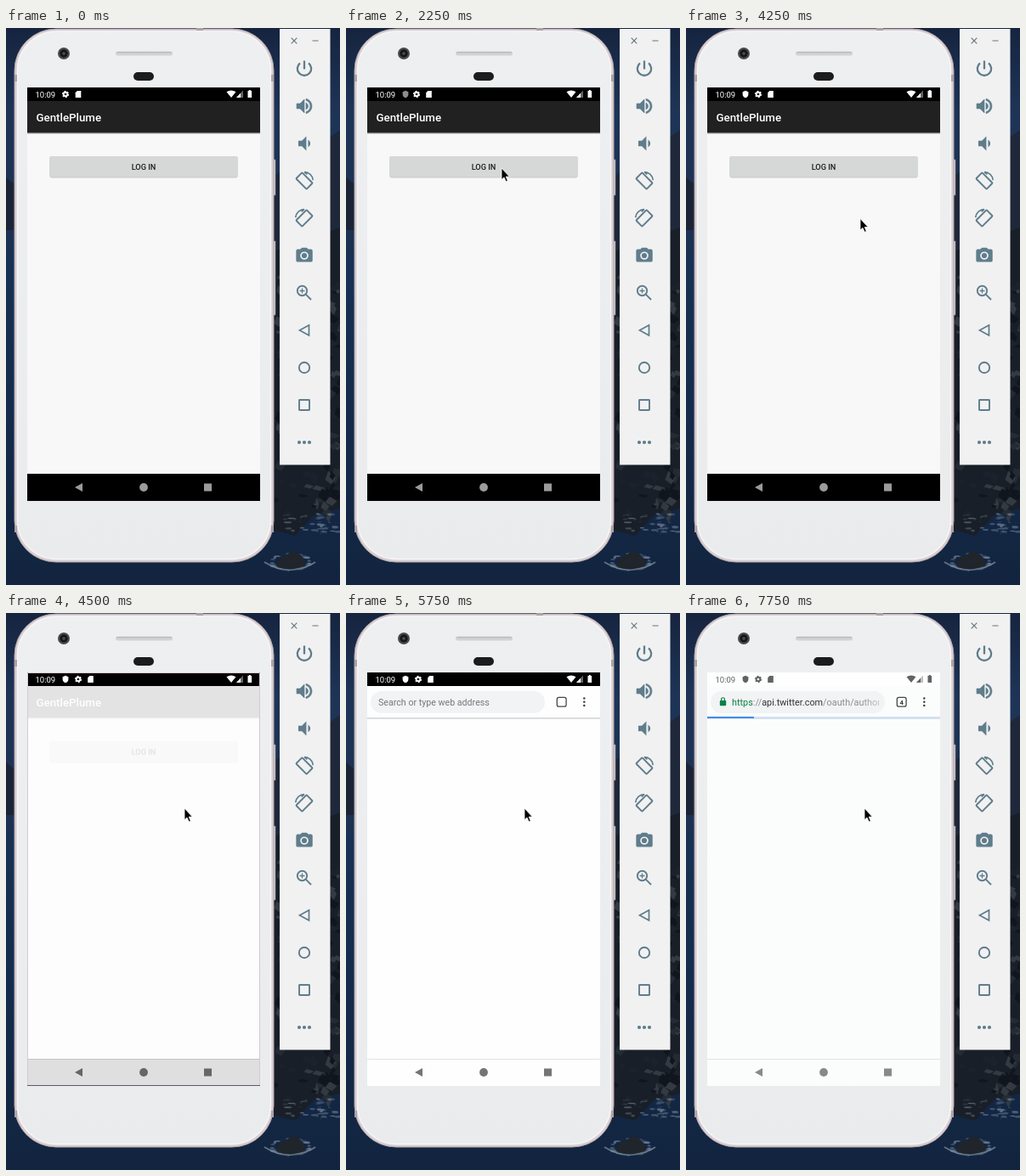
An HTML page for the animation above (8000 ms loop, 393 px wide and 656 px high).

```html
<!DOCTYPE html>
<html lang="en">
<head>
<meta charset="utf-8">
<title>Emulator login</title>
<style>
  html, body { margin: 0; width: 100%; height: 100%; overflow: hidden; background: #14294a; }
  svg { display: block; width: 393px; height: 656px; font-family: Roboto, Arial, sans-serif; }
  .tool { fill: #5f7d8b; }
  .line { fill: none; stroke: #5f7d8b; stroke-width: 1.9; }
</style>
</head>
<body>
<svg viewBox="0 0 393 656" xmlns="http://www.w3.org/2000/svg">
  <defs>
    <linearGradient id="sea" x2="0" y2="1">
      <stop offset="0" stop-color="#16243f"/>
      <stop offset=".15" stop-color="#1e3457"/>
      <stop offset=".36" stop-color="#1d3252"/>
      <stop offset=".42" stop-color="#173154"/>
      <stop offset=".7" stop-color="#142b4b"/>
      <stop offset="1" stop-color="#12243f"/>
    </linearGradient>
    <linearGradient id="shell" x2="0" y2="1">
      <stop offset="0" stop-color="#eeeff0"/>
      <stop offset="1" stop-color="#e9ebed"/>
    </linearGradient>
    <linearGradient id="urlFade" x1="205" x2="229" gradientUnits="userSpaceOnUse">
      <stop offset="0" stop-color="#f1f3f4" stop-opacity="0"/>
      <stop offset="1" stop-color="#f1f3f4" stop-opacity=".6"/>
    </linearGradient>
    <clipPath id="urlClip"><rect x="30" y="92" width="197" height="26"/></clipPath>
    <clipPath id="screenClip"><rect x="25" y="70" width="274" height="487"/></clipPath>
    <g id="gear">
      <circle r="2.3" fill="none" stroke="currentColor" stroke-width="1.900"/>
      <circle r="3.500" fill="none" stroke="currentColor" stroke-width="1.300" stroke-dasharray="1.830 1.830"/>
    </g>
    <path id="card" d="M-1.200 -4H3.300V4H-3.300V-1.800Z" fill="currentColor"/>
    <path id="shield" d="M0 -4.200L3.400 -2.800V0C3.400 2.100 2 3.700 0 4.300C-2 3.700 -3.400 2.100 -3.400 0V-2.800Z" fill="currentColor"/>
  </defs>

  <!-- wallpaper -->
  <rect width="393" height="656" fill="url(#sea)"/>
  <path d="M0 176L10 184V238H0Z" fill="#1b2437"/>
  <path d="M310 178L393 120V330L310 290Z" fill="#1e283a"/>
  <path d="M310 265L393 235V566L362 574L340 598L310 590Z" fill="#191f28"/>
  <g id="rocks"></g>
  <g id="foam"></g>
  <path d="M318 634Q320 622 330 621Q337 613 346 620Q354 627 351 636Q331 640 318 634Z" fill="#20252c"/>
  <path d="M304 629Q322 640 338 638T364 629" fill="none" stroke="#8796a6" stroke-width="1.600" opacity=".7"/>

  <!-- phone -->
  <path d="M314 155h3v42h-3zM314 251h3v87h-3z" fill="#d9d5d7" stroke="#83858d" stroke-width=".6"/>
  <rect x="10" y="1" width="305" height="628" rx="49" fill="#dacfd2" stroke="#aca3a8"/>
  <rect x="13.500" y="4" width="298" height="621.500" rx="46" fill="url(#shell)" stroke="#f8f6f7" stroke-width="1.500"/>
  <path d="M10 55h3v8h-3zM312 55h3v8h-3zM10 586h3v8h-3zM312 586h3v8h-3zM224 0h8v3h-8z" fill="#aaa2a6"/>
  <circle cx="68" cy="30" r="7" fill="#4b4b4d"/>
  <circle cx="68" cy="30" r="4.700" fill="#171719"/>
  <circle cx="68" cy="30" r="1.800" fill="#4e5155"/>
  <rect x="129" y="27.500" width="67" height="5" rx="2.500" fill="#d2d3d4"/>
  <rect x="130" y="28" width="65" height="1.500" rx=".7" fill="#bdbec0"/>
  <rect x="150" y="52" width="24" height="10" rx="5" fill="#1c1c1e"/>

  <!-- screen -->
  <g clip-path="url(#screenClip)">
    <rect x="25" y="70" width="274" height="487" fill="#f8f8f8"/>
    <rect x="25" y="86" width="274" height="38" fill="#212121"/>
    <rect x="25" y="123.500" width="274" height="1.500" fill="#c9c9c9"/>
    <text x="35.500" y="110" font-size="13.300" font-weight="500" fill="#fff">GentlePlume</text>
    <rect x="51.500" y="152" width="221" height="24.500" rx="2" fill="#c9c9c9"/>
    <rect id="button" x="51" y="151" width="222" height="24.500" rx="2"/>
    <text x="162" y="167" font-size="9.200" font-weight="500" text-anchor="middle" fill="#1c1c1c">LOG IN</text>
    <rect x="25" y="525" width="274" height="32" fill="#000"/>

    <g id="browser">
      <rect id="page" x="25" y="86" width="274" height="471"/>
      <g id="omnibox">
        <rect x="29" y="92" width="205" height="26" rx="13" fill="#f1f3f4"/>
        <text id="hint" x="38" y="109" font-size="10.670" fill="#75787b">Search or type web address</text>
        <g id="address" clip-path="url(#urlClip)">
          <text id="url" y="109" font-size="10.850" fill="#8a8d90"><tspan id="scheme">https</tspan><tspan>://</tspan><tspan fill="#303336">api.twitter.com</tspan><tspan>/oauth/authorize</tspan></text>
          <rect x="205" y="96" width="24" height="18" fill="url(#urlFade)"/>
        </g>
        <g id="lock">
          <rect x="39.800" y="103" width="7.400" height="6.200" rx="1" fill="#0b8043"/>
          <path d="M41.500 103.500V101.700a2 2 0 0 1 4 0V103.500" fill="none" stroke="#0b8043" stroke-width="1.100"/>
        </g>
        <rect x="248.300" y="99.300" width="10.800" height="10.800" rx="2.200" fill="none" stroke="#45484a" stroke-width="1.300"/>
        <text id="tabs" x="253.700" y="107.500" font-size="7.600" font-weight="700" text-anchor="middle" fill="#333">4</text>
        <path d="M280.300 100.500h0M280.300 104.800h0M280.300 109.100h0" stroke="#3c3f42" stroke-width="2.500" stroke-linecap="round"/>
        <rect x="25" y="123" width="274" height="2" fill="#dadcdd"/>
      </g>
      <g id="progress">
        <rect x="25" y="122" width="274" height="2" fill="#cfe2fc"/>
        <rect id="bar" x="25" y="122" height="2" fill="#3f8cf0"/>
      </g>
      <rect x="25" y="525" width="274" height="1" fill="#e2e2e2"/>
    </g>

    <g id="nav">
      <path d="M90 536V546L81 541ZM233 536.500h9v9h-9z"/>
      <circle cx="162" cy="541" r="4.900"/>
    </g>

    <rect id="status" x="25" y="70" width="274" height="16"/>
    <g id="icons">
      <text x="34.500" y="81.500" font-size="9.500" fill="currentColor">10:09</text>
      <use id="shieldIcon" href="#shield" x="70" y="78"/>
      <use id="gearIcon" href="#gear" y="78"/>
      <use id="cardIcon" href="#card" y="78"/>
      <path d="M259.500 75.300Q265 71.800 270.500 75.300L265 82Z" fill="currentColor"/>
      <path d="M279 73.500V82H271Z" fill="currentColor" opacity=".4"/>
      <path d="M276 76.700V82H271Z" fill="currentColor"/>
      <path d="M285.800 73h2v1h1.300v8h-4.600v-8h1.300z" fill="currentColor"/>
    </g>
    <g id="edge" fill="none">
      <path d="M25.500 557V70.500H298.500V557" stroke="#d9c8d2"/>
      <path d="M25 556.500H299" stroke="#5e5965"/>
    </g>
  </g>

  <!-- emulator controls -->
  <rect x="322" y="1" width="59.500" height="513.500" fill="#f1f1f2"/>
  <path d="M335.700 11.700l6.600 6.600m0-6.600l-6.600 6.600M360.500 15h7" stroke="#66757d" stroke-width="1.200"/>
  <path class="line" style="stroke-width:2.300" d="M351 38.500V48.500M346 41.300A8.200 8.200 0 1 0 356 41.300"/>
  <path class="tool" transform="translate(339 80)" stroke="#5f7d8b" stroke-width=".6" d="M3 9v6h4l5 5V4L7 9H3zm13.500 3c0-1.770-1.020-3.290-2.500-4.030v8.050c1.480-.73 2.500-2.250 2.500-4.020zM14 3.230v2.060c2.890.86 5 3.540 5 6.710s-2.110 5.850-5 6.710v2.060c4.010-.91 7-4.490 7-8.770s-2.990-7.860-7-8.770z"/>
  <path class="tool" transform="translate(338.700 123.400) scale(1.050)" d="M18.500 12c0-1.770-1.020-3.290-2.500-4.030v8.050c1.480-.73 2.500-2.250 2.500-4.020zM5 9v6h4l5 5V4L9 9H5z"/>
  <g id="turns"></g>
  <path class="tool" fill-rule="evenodd" transform="translate(339.400 256.800) scale(.970 .940)" d="M9 2L7.200 4H4a2 2 0 0 0-2 2v12a2 2 0 0 0 2 2h16a2 2 0 0 0 2-2V6a2 2 0 0 0-2-2h-3.200L15 2zM12 7a5 5 0 1 1 0 10a5 5 0 1 1 0-10z"/>
  <circle class="tool" cx="351" cy="268" r="3.100"/>
  <circle class="line" cx="348.500" cy="309.500" r="5.700"/>
  <path class="line" d="M352.700 313.700L359 320"/>
  <path class="line" style="stroke-width:1.300" d="M345.500 309.500h6m-3-3v6"/>
  <path class="line" style="stroke-width:1.700" d="M356.500 350V362L345.500 356Z"/>
  <circle class="line" cx="351" cy="400" r="6.200"/>
  <rect class="line" x="345" y="438" width="12" height="12" rx=".5"/>
  <path d="M345 488h0M351 488h0M357 488h0" stroke="#5f7d8b" stroke-width="4.200" stroke-linecap="round"/>

  <path id="cursor" d="M0 0V13.500L3 10.900L5.200 15.800L7.300 14.900L5.200 10.100H9.300Z" fill="#000" stroke="#fff" stroke-width=".8"/>
</svg>
<script>
const LOOP = 8000;
const el = id => document.getElementById(id);
const set = (id, attrs) => {
  for (const key in attrs) el(id).setAttribute(key, attrs[key]);
};
const show = (id, on) => set(id, { visibility: on ? "inherit" : "hidden" });

// Each track lists [start ms, value]; the value holds until the next start.
const tracks = {
  cursor: [[0, null], [250, [251.5, 128]], [500, [194.5, 151]], [750, [183, 165]],
           [3000, [179, 165.5]], [3250, [156, 162]], [4250, [205, 224.5]], [4500, [210, 230]]],
  notice: [[0, [0, 70, 85]], [2250, [.55, 83, 97.5]], [2500, [1, 85, 99.5]]],
  button: [[0, "#d6d7d7"], [3750, "#bfc0c0"], [4000, "#d6d7d7"]],
  browser: [[0, 0], [4500, .88], [4750, 1]],
  edge: [[0, 0], [4500, 1], [5000, 0]],
  omnibox: [[0, 0], [4750, .2], [5000, 1]],
  nav: [[0, "#9b9b9b"], [4500, "#666"], [4750, "#555"], [5250, "#626262"], [5750, "#757575"], [6250, "#898989"]],
  status: [[0, "#000"], [6500, "#fefefe"]],
  icons: [[0, "#fff"], [6750, "#606366"]],
  page: [[0, "#fefefe"], [7500, "#fbfdfd"]],
  loading: [[0, 0], [6750, 1]],
  progress: [[0, 0], [7000, 14], [7750, 55]],
  secure: [[0, 0], [7750, 1]]
};
const at = (name, t) => tracks[name].filter(step => step[0] <= t).pop()[1];

function draw(t) {
  const pos = at("cursor", t);
  show("cursor", pos);
  if (pos) set("cursor", { transform: `translate(${pos})` });

  const [shield, gearX, cardX] = at("notice", t);
  set("shieldIcon", { opacity: shield });
  set("gearIcon", { x: gearX });
  set("cardIcon", { x: cardX });

  for (const id of ["button", "nav", "status", "page"]) set(id, { fill: at(id, t) });
  for (const id of ["browser", "omnibox", "edge"]) set(id, { opacity: at(id, t) });
  set("icons", { color: at("icons", t) });

  const loading = at("loading", t), secure = at("secure", t), width = at("progress", t);
  show("hint", !loading);
  show("address", loading);
  show("tabs", loading);
  show("lock", secure);
  show("progress", width);
  set("bar", { width });
  set("url", { x: secure ? 54 : 38 });
  set("scheme", { fill: secure ? "#0b8043" : "#8a8d90" });
}

// Shore texture from a small seeded generator
let seed = 7;
const rand = () => (seed = seed * 16807 % 2147483647) / 2147483647;
const repeat = (count, make) => Array.from({ length: count }, (_, i) => make(i)).join("");

const tones = ["#11161e", "#252b33", "#343a41", "#1b222c"];
el("rocks").innerHTML = repeat(150, i => {
  const x = 316 + rand() * 77, y = 290 + rand() * 285;
  const w = 3 + rand() * 8, h = 2 + rand() * 6;
  return `<path d="M${x} ${y}l${w} ${h}l${-w * .6} ${h}l${-w * .8} ${-h * .7}z" fill="${tones[i % 4]}"/>`;
});

// Foam gathers along the foot of the rocks and around the islet.
el("foam").innerHTML = repeat(90, i => {
  const angle = rand() * 2 * Math.PI;
  const [x, y] = i % 2
    ? [325 + rand() * 68, 572 + rand() * 24]
    : [335 + Math.cos(angle) * 22, 629 + Math.sin(angle) * 10];
  return `<ellipse cx="${x}" cy="${y}" rx="${1 + rand() * 4}" ry="${.4 + rand()}" fill="#8293a6" opacity="${.15 + rand() * .4}"/>`;
});

el("turns").innerHTML = [[180, 1], [224, -1]].map(([y, side]) =>
  `<g class="line" transform="translate(351 ${y}) scale(${side * .92} .92)">
    <rect x="-9.500" y="-5.500" width="19" height="11" rx="1" transform="rotate(45)" stroke-width="2.100"/>
    <path d="M0 -11.200A11.200 11.200 0 0 1 11.200 -1M0 -11.200L3.700 -8.200" stroke-width="1.800"/>
  </g>`).join("");

const start = performance.now();
function tick() {
  draw((performance.now() - start) % LOOP);
  requestAnimationFrame(tick);
}
tick();
</script>
</body>
</html>
```
